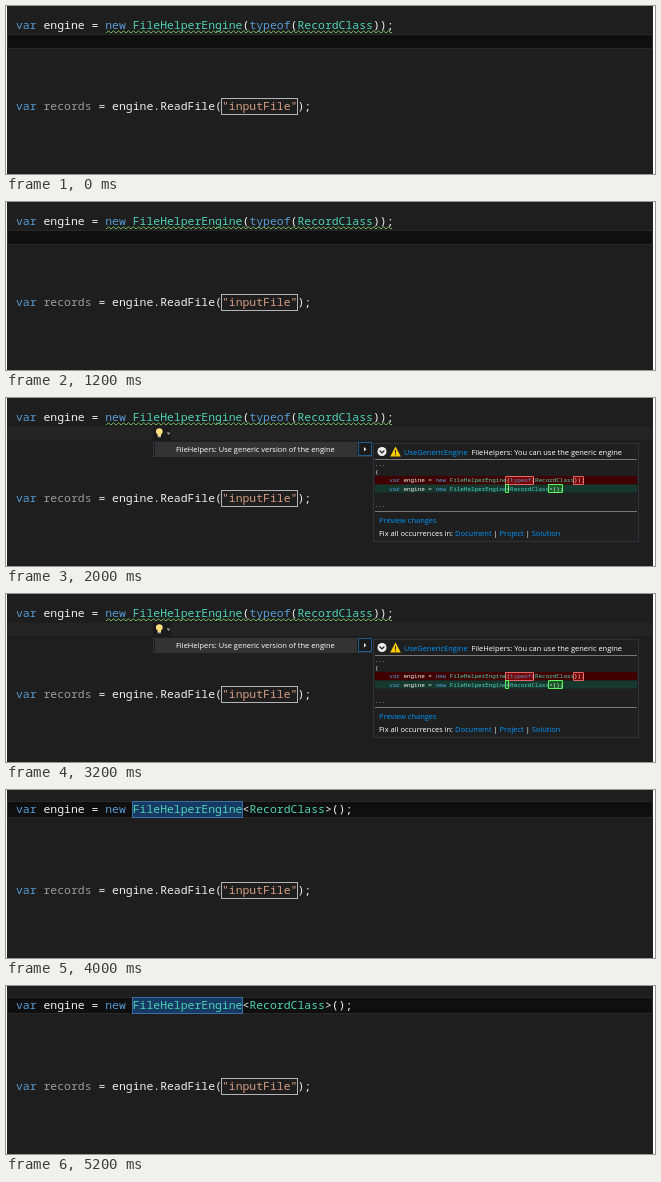
Recreate the animation shown at these times as an HTML page. Size 649 by 168 pixels, loop 6000 ms.

```html
<!DOCTYPE html>
<html lang="en">
<head>
<meta charset="utf-8">
<style>
  html, body { margin: 0; height: 100%; overflow: hidden; background: #fff; }
  svg { display: block; }
  text { white-space: pre; fill: #f0f0f0; }
  .code { font: 500 11.45px "Noto Sans Mono", monospace; }
  .small { font: 500 5.93px "Noto Sans Mono", monospace; }
  .ui { font: 7.47px "Open Sans", sans-serif; fill: #fff; }
  .k { fill: #569cd6; }
  .t { fill: #4ed3b6; }
  .s { fill: #d69d85; }
  .dim { fill: #9b9b9b; }
  .link { fill: #0097fb; }
</style>
</head>
<body>
<svg width="649" height="168" viewBox="0 0 649 168">
  <defs>
    <pattern id="wave" width="5" height="4" x="100" y="24" patternUnits="userSpaceOnUse">
      <path d="M-1 3.8L2.5 .8L6 3.8" fill="none" stroke="#6fb05c"/>
    </pattern>
  </defs>
  <rect x="1" width="646" height="168" fill="#1e1e1e"/>

  <rect id="focusLine" x="1.5" y="28.5" width="645" height="14" fill="#0f0f0f" stroke="#282828"/>
  <rect id="blurLine" x="1" y="29" width="646" height="13" fill="#242424"/>

  <g id="before">
    <text class="code" x="10" y="23"><tspan class="k">var</tspan> engine = <tspan class="k">new</tspan> <tspan class="t">FileHelperEngine</tspan>(<tspan class="k">typeof</tspan>(<tspan class="t">RecordClass</tspan>));</text>
    <rect x="100" y="24" width="286" height="4" fill="url(#wave)"/>
  </g>

  <g id="after">
    <rect x="1.5" y="11.5" width="645" height="16" fill="#0f0f0f" stroke="#282828"/>
    <rect x="126.5" y="11.5" width="110" height="16" fill="#163a63" stroke="#3b6ea5"/>
    <text class="code" x="10" y="23"><tspan class="k">var</tspan> engine = <tspan class="k">new</tspan> <tspan class="t">FileHelperEngine</tspan>&lt;<tspan class="t">RecordClass</tspan>&gt;();</text>
  </g>

  <rect x="215.5" y="92.5" width="76" height="16" fill="none" stroke="#b4b4b4"/>
  <text class="code" x="10" y="104"><tspan class="k">var</tspan> <tspan class="dim">records</tspan> = engine.ReadFile(<tspan class="s">"inputFile"</tspan>);</text>

  <g id="menu">
    <rect x="147" y="29" width="18" height="13" fill="#1b1b1c"/>
    <path d="M151.6 36.5a3.4 3.4 0 1 1 3.4 0v1.5h-3.4z" fill="#ffdf80"/>
    <path d="M151.7 38.8h3.2" stroke="#ddd"/>
    <path d="M160.5 34.5h4l-2 2.4z" fill="#999"/>

    <rect x="147.5" y="44.5" width="218" height="14" fill="#1b1b1c" stroke="#333337"/>
    <rect x="149" y="45" width="202" height="13" fill="#333334"/>
    <text class="ui" x="170" y="54.3">FileHelpers: Use generic version of the engine</text>
    <rect x="352.5" y="44.5" width="13" height="13" fill="#1b1b1c" stroke="#1d5c92"/>
    <path d="M358 49l2.3 2.3l-2.3 2.3z" fill="#eee"/>

    <rect x="367.5" y="45.5" width="265" height="98" fill="#1f1f20" stroke="#333337"/>
    <circle cx="376" cy="53.5" r="4.5" fill="#f1f1f1"/>
    <path d="M373.6 52.5l2.4 2.4l2.4-2.4" fill="none" stroke="#222" stroke-width="1.2"/>
    <path d="M389.5 48.5l5.3 10h-10.6z" fill="#fc0"/>
    <path d="M389.5 52v3.4m0 .8v1.2" stroke="#222"/>
    <text class="ui" x="398" y="57"><tspan class="link">UseGenericEngine</tspan>  FileHelpers: You can use the generic engine</text>

    <path d="M369 61.5h262M369 113.5h262" stroke="#777"/>
    <rect x="369" y="78" width="262" height="8.5" fill="#400000"/>
    <rect x="369" y="86.5" width="262" height="8" fill="#16382f"/>
    <path d="M499.5 78.5h28v8h-28zM567.5 78.5h10v8h-10z" fill="#700" stroke="#d66"/>
    <path d="M499.5 86.5h3v8h-3zM542.5 86.5h14v8h-14z" fill="#165a26" stroke="#6e6"/>
    <text class="small" x="369" y="67.5">...</text>
    <text class="small" x="369" y="76">{</text>
    <text class="small" x="369" y="84.3">    <tspan class="k">var</tspan> engine = <tspan class="k">new</tspan> <tspan class="t">FileHelperEngine</tspan>(<tspan class="k">typeof</tspan>(<tspan class="t">RecordClass</tspan>));</text>
    <text class="small" x="369" y="92.6">    <tspan class="k">var</tspan> engine = <tspan class="k">new</tspan> <tspan class="t">FileHelperEngine</tspan>&lt;<tspan class="t">RecordClass</tspan>&gt;();</text>
    <text class="small" x="369" y="109">...</text>

    <text class="ui link" x="373" y="125">Preview changes</text>
    <text class="ui" x="373" y="138">Fix all occurrences in: <tspan class="link">Document</tspan> | <tspan class="link">Project</tspan> | <tspan class="link">Solution</tspan></text>
  </g>
</svg>
<script>
  const show = (id, on) => {
    document.getElementById(id).style.display = on ? "" : "none";
  };

  function draw() {
    const step = Math.floor(performance.now() / 2000) % 3;
    show("focusLine", step === 0);
    show("blurLine", step === 1);
    show("before", step < 2);
    show("menu", step === 1);
    show("after", step === 2);
    requestAnimationFrame(draw);
  }
  draw();
</script>
</body>
</html>
```
